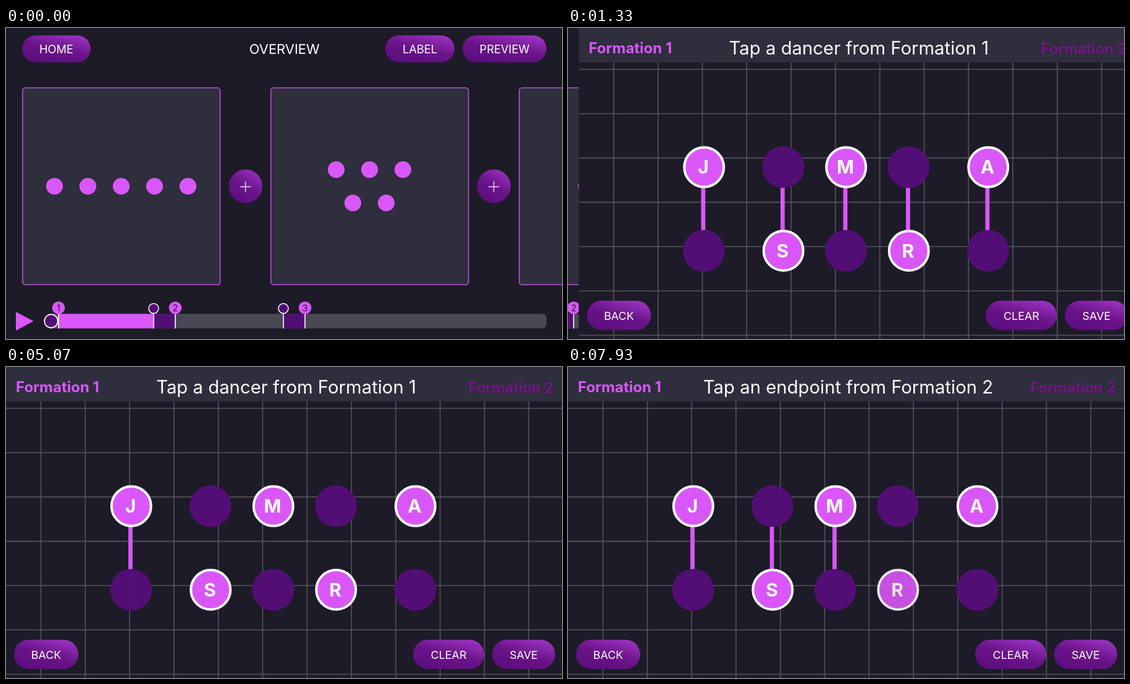
An HTML page for the animation above (8000 ms loop, 900 by 504 pixels).

```html
<!DOCTYPE html>
<html lang="en">
<head>
<meta charset="utf-8">
<title>Formations</title>
<style>
html, body { margin: 0; width: 100%; height: 100%; overflow: hidden; background: #1d1b27; }
svg { display: block; width: 100%; height: 100%; font-family: Inter, "Liberation Sans", sans-serif; }
text { fill: #fff; }
</style>
</head>
<body>
<svg id="stage" viewBox="0 0 900 504">
  <defs>
    <linearGradient id="violet" x1="0.2" y1="1" x2="0.8" y2="0">
      <stop offset="0" stop-color="#5b0d7d"/>
      <stop offset="0.5" stop-color="#6a1489"/>
      <stop offset="1" stop-color="#9a33c0"/>
    </linearGradient>
  </defs>
  <rect width="900" height="504" fill="#1d1b27"/>
  <g id="overview"></g>
  <g id="editor"></g>
</svg>
<script>
const LOOP = 8000, STEP = 1000 / 15;
const PINK = '#d957f8', DARK = '#530e76', PANEL = '#2e2e3d';
const PUSH = 947, LABEL_TAP = 800, CLEAR_TAP = 2760;
const TITLES = ['Tap a dancer from Formation 1', 'Tap an endpoint from Formation 2'];

// start: dancer tapped, end: endpoint tapped
const dancers = [
  { name: 'J', x: 202.8, top: true, start: 4430, end: 4780 },
  { name: 'S', x: 331.3, top: false, start: 5520, end: 6125 },
  { name: 'M', x: 432.8, top: true, start: 6720, end: 7240 },
  { name: 'R', x: 534.3, top: false, start: 7730, end: Infinity },
  { name: 'A', x: 662.8, top: true, start: Infinity, end: Infinity }
];

const overview = document.getElementById('overview');
const editor = document.getElementById('editor');

function add(parent, tag, attrs, content) {
  const el = document.createElementNS('http://www.w3.org/2000/svg', tag);
  for (const key in attrs) el.setAttribute(key, attrs[key]);
  if (content) el.textContent = content;
  parent.appendChild(el);
  return el;
}

function label(parent, x, y, size, content, attrs) {
  return add(parent, 'text', { x, y, 'font-size': size, 'text-anchor': 'middle', ...attrs }, content);
}

function circle(parent, cx, cy, r, fill, attrs) {
  return add(parent, 'circle', { cx, cy, r, fill, ...attrs });
}

function rect(parent, x, y, width, height, fill, attrs) {
  return add(parent, 'rect', { x, y, width, height, fill, ...attrs });
}

function line(parent, d, stroke, width) {
  return add(parent, 'path', { d, stroke, 'stroke-width': width, fill: 'none' });
}

function pill(parent, x, y, width, height, size, content) {
  const g = add(parent, 'g', {});
  rect(g, x, y, width, height, 'url(#violet)', { rx: height / 2 });
  label(g, x + width / 2, y + height / 2 + size * 0.4, size, content);
  return g;
}

function plus(x) {
  const g = add(overview, 'g', {});
  circle(g, x, 256.5, 27.2, 'url(#violet)');
  line(g, `M${x - 8.7} 257.3h17.4M${x} 248.6v17.4`, '#cfaede', 1.9);
  return g;
}

function buildOverview() {
  pill(overview, 26, 12, 111, 43.5, 18.3, 'HOME');
  label(overview, 450.7, 41.7, 21.9, 'OVERVIEW');
  const tapped = pill(overview, 614, 12, 112, 43.5, 18.3, 'LABEL');
  pill(overview, 739, 12, 136, 43.5, 18.3, 'PREVIEW');

  for (let i = 0; i < 3; i++) {
    rect(overview, 26.8 + i * 402, 97, 319.8, 319, PANEL, { rx: 4.5, stroke: '#b94fd6', 'stroke-width': 1.6 });
  }
  for (let i = 0; i < 5; i++) {
    circle(overview, 78.5 + i * 54, 256.5, 13.6, PINK);
    circle(overview, i < 3 ? 534.5 + i * 54 : 561.5 + (i - 3) * 54, i < 3 ? 229.5 : 283.5, 13.6, PINK);
  }
  const adders = [plus(387.7), plus(789.7)];

  add(overview, 'path', { d: 'M16 460L44.5 475L16 490.5Z', fill: PINK });
  rect(overview, 66, 463.3, 809, 23.4, '#4b4855', { rx: 7 });
  rect(overview, 85, 463.3, 154, 23.4, PINK);
  for (const x of [239, 449]) {
    rect(overview, x, 463.3, 35, 23.4, DARK);
    line(overview, `M${x} 462v25`, '#fff', 1.6);
    circle(overview, x, 454.5, 8, DARK, { stroke: '#fff', 'stroke-width': 1.5 });
  }
  [85, 274, 484].forEach((x, i) => {
    line(overview, `M${x} 462v25`, '#fff', 1.6);
    circle(overview, x, 453.5, 10.3, PINK);
    label(overview, x, 458.5, 14, String(i + 1), { style: 'fill:#24102e' });
  });
  circle(overview, 73, 475, 10.8, DARK, { stroke: '#fff', 'stroke-width': 1.7 });
  return { tapped, adders };
}

function buildEditor() {
  rect(editor, 0, 0, 900, 504, '#1d1b27');
  let grid = '';
  for (let i = 0; i < 12; i++) grid += `M${56.5 + i * 71.8} 56V504`;
  for (let i = 0; i < 7; i++) grid += `M0 ${67 + i * 71.8}H900`;
  line(editor, grid, '#55545c', 1.6);

  rect(editor, 0, 0, 900, 56, PANEL);
  label(editor, 16, 40.5, 24, 'Formation 1', { 'text-anchor': 'start', 'font-weight': 700, style: 'fill:' + PINK });
  label(editor, 886.5, 41.5, 24, 'Formation 2', { 'text-anchor': 'end', 'font-weight': 600, style: 'fill:#7b108d' });
  const title = label(editor, 453.5, 42.6, 29.3, TITLES[0]);

  for (const d of dancers) {
    d.link = line(editor, `M${d.x - 1.3} ${d.top ? 225 : 195}V${d.top ? 391 : 361}`, PINK, 6.8);
  }
  for (const d of dancers) {
    const y = d.top ? 225.5 : 361;
    d.spot = circle(editor, d.x - 0.3, d.top ? 361 : 225.5, 33.8, DARK);
    d.token = add(editor, 'g', {});
    circle(d.token, d.x, y, 32, PINK, { stroke: '#fff', 'stroke-width': 4 });
    label(d.token, d.x - 1.3, y + 10.8, 30, d.name, { 'font-weight': 700 });
  }

  pill(editor, 13, 442, 104, 47.5, 17.9, 'BACK');
  const clear = pill(editor, 659, 442, 115, 47.5, 17.9, 'CLEAR');
  pill(editor, 787, 442, 102, 47.5, 17.9, 'SAVE');
  return { title, clear };
}

// Opacity of a button that dims on tap and recovers
function dim(t, tap) {
  const p = (t - tap) / 350;
  return p < 0 || p >= 1 ? 1 : 1 - 0.6 * (1 - p) ** 2;
}

function pushed(t) {
  const s = Math.max(0, t - PUSH) * 0.0152;
  return t > PUSH + 780 ? 1 : 1 - (1 + s) * Math.exp(-s);
}

const { tapped, adders } = buildOverview();
const { title, clear } = buildEditor();

function render(t) {
  const p = pushed(t);
  overview.setAttribute('transform', `translate(${-270 * p} 0)`);
  editor.setAttribute('transform', `translate(${900 * (1 - p)} 0)`);
  for (const b of adders) b.setAttribute('opacity', 1 - p);
  tapped.setAttribute('opacity', dim(t, LABEL_TAP));
  clear.setAttribute('opacity', dim(t, CLEAR_TAP));

  let picking = false;
  for (const d of dancers) {
    if (t >= d.start && t < d.end) picking = true;
    d.link.setAttribute('visibility', t < CLEAR_TAP || t >= d.end ? 'visible' : 'hidden');
    d.token.setAttribute('opacity', dim(t, d.start));
    d.spot.setAttribute('opacity', dim(t, d.end));
  }
  title.textContent = TITLES[picking ? 1 : 0];
}

// The picture advances at 15 steps per second; the 4 ms absorb timer rounding
function tick() {
  const t = performance.now() % LOOP;
  render(Math.floor((t + 4) / STEP) * STEP);
  requestAnimationFrame(tick);
}
tick();
</script>
</body>
</html>
```
